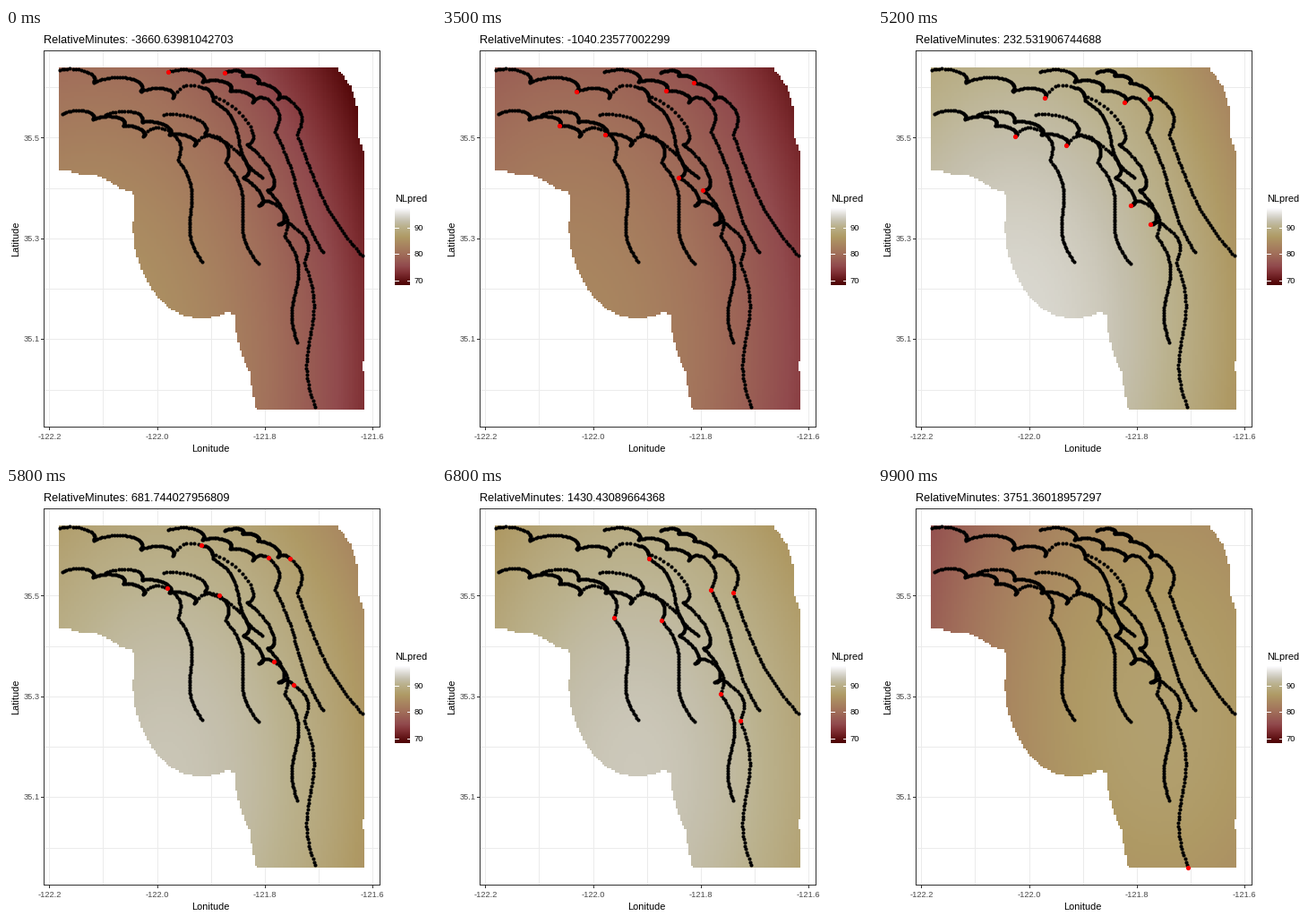
A matplotlib script for the animation above (10 s loop, 480x480 px).

```python
import numpy as np
import matplotlib.pyplot as plt
from matplotlib.animation import FuncAnimation
from matplotlib.colors import LinearSegmentedColormap
from matplotlib.patches import Rectangle

SIZE, DPI, FRAMES = 480, 80, 100
PT = 72 / DPI
T0, SPAN = -3660.6398104270298, 7412
LOW, HIGH = 68, 96.7
LEFT, RIGHT, TOP, BOTTOM = 59, 400, 44, 426
REACH = 63

plt.rcParams["font.family"] = "Liberation Sans"

STOPS = [(LOW, "#4c0001"), (72.5, "#7f2f33"), (75, "#914a4d"),
         (80, "#a2715b"), (86, "#af9a65"), (90, "#bbb28e"),
         (92, "#c5c0ae"), (94, "#dad8d0"), (HIGH, "#fdfdff")]
CMAP = LinearSegmentedColormap.from_list(
    "noise", [((v - LOW) / (HIGH - LOW), c) for v, c in STOPS], N=512)


class Track:
    """Scalloped drift between turning points, then a swaying run south."""

    def __init__(self, *pts, start=T0 + 40, end=3700, sway=7, bow=0):
        self.p = np.array(pts, float)
        self.times = np.array([start, -2600, -1040, 232, 682, 1430, end])
        self.start, self.end, self.sway, self.bow = start, end, sway, bow

    def at(self, t):
        last = len(self.p) - 2
        k = np.clip(np.searchsorted(self.times, t, "right") - 1, 0, last)
        u = (t - self.times[k]) / (self.times[k + 1] - self.times[k])
        d = self.p[k + 1] - self.p[k]
        length = np.hypot(*d.T)
        normal = np.stack([d[..., 1], -d[..., 0]], -1) / length[..., None]
        hump = np.sin(np.pi * u)
        along = u + np.where(k < 3, 0.42, 0) * hump * u
        side = np.where(k < last, 0.23 * length * hump,
                        self.sway * np.sin(2 * np.pi * u) + self.bow * hump)
        return self.p[k] + d * along[..., None] + normal * side[..., None]

    def dots(self):
        return self.at(np.arange(self.start, self.end + 1, 52))


tracks = [
    Track((60, 47), (97, 61), (150, 71), (186, 78), (218, 66), (231, 81),
          (288, 168)),
    Track((181, 49), (219, 60), (250, 70), (275, 83), (293, 80), (300, 116),
          (355, 252), start=T0, sway=3, bow=-2),
    Track((244, 50), (264, 53), (281, 61), (303, 79), (317, 81), (325, 119),
          (399, 256), start=T0, sway=1, bow=-9),
    Track((63, 96), (97, 102), (131, 109), (153, 121), (180, 114), (192, 147),
          (220, 263)),
    Track((111, 97), (151, 105), (182, 119), (210, 131), (238, 122),
          (245, 150), (283, 265)),
    Track((176, 97), (221, 118), (264, 167), (282, 198), (299, 196),
          (311, 232), (326, 353), bow=5),
    Track((230, 75), (268, 130), (291, 181), (304, 219), (321, 222),
          (333, 262), (346, 426), end=T0 + SPAN),
]
dots = np.vstack([tr.dots() for tr in tracks])

# Tiles near any track carry the noise field
gx, gy = np.meshgrid(LEFT + (np.arange(142) + .5) * (RIGHT - LEFT) / 142,
                     TOP + (np.arange(169) + .5) * (BOTTOM - TOP) / 169)
OUTSIDE = np.ones(gx.shape, bool)
for px, py in dots:
    OUTSIDE &= (gx - px) ** 2 + (gy - py) ** 2 > REACH ** 2
X, Y = (gx - 230) / 200, (gy - 235) / 200

# Level and slopes of the field, eased from one time to the next
WHEN = [T0, -2238, -1040, 232, 682, 1430, T0 + SPAN]
LEVEL = [81.8, 84.4, 81.5, 92.7, 91.7, 92.3, 86]
EAST = [-7.4, -5.3, -4.9, -4.2, -2.8, -0.8, 4.6]
SOUTH = [3, 2.8, 2.5, 2, 1.8, 1.7, 0.5]


def field(t):
    level, east, south = (np.interp(t, WHEN, v) for v in (LEVEL, EAST, SOUTH))
    z = level + east * X + south * Y - 5.5 * X ** 2 - 2 * Y ** 2
    return np.ma.array(z, mask=OUTSIDE)


fig = plt.figure(figsize=(SIZE / DPI, SIZE / DPI), dpi=DPI, facecolor="white")
ax = fig.add_axes([0, 0, 1, 1])


def text(x, y, s, px, color="black", **kw):
    return ax.text(x, y, s, fontsize=px * PT, color=color, **kw)


def line(x, y, color, z=1):
    ax.plot(x, y, color=color, lw=PT, zorder=z, antialiased=False,
            solid_capstyle="butt")


# Grid, axis ticks and labels
for i in range(7):
    x = 48.3 + i * 60.15
    line((x, x), (25, 444), "#ebebeb")
    if i % 2 == 0:
        line((x, x), (445, 448), "#333333")
        text(x, 459, f"{-122.2 + i / 10:.1f}", 9.3, "#4d4d4d", ha="center")
for i in range(-1, 6):
    y = 122.3 + i * 56.25
    line((43, 417), (y, y), "#ebebeb")
    if i in (0, 2, 4):
        line((39, 42), (y, y), "#333333")
        text(37.5, y + 3.2, f"{35.5 - i / 10:.1f}", 9.3, "#4d4d4d", ha="right")
ax.add_patch(Rectangle((42.4, 24.6), 375, 420, fill=False, ec="#333333",
                       lw=PT, zorder=6, antialiased=False))
text(228.5, 473, "Lonitude", 11, ha="center")
text(11.5, 235, "Latitude", 11, ha="center", va="center", rotation=90)

# Legend
text(434, 194, "NLpred", 11)
ax.imshow(np.linspace(HIGH, LOW, 256)[:, None], cmap=CMAP, vmin=LOW, vmax=HIGH,
          extent=(434, 451, 287.5, 202), aspect="auto", zorder=2)
for value in (90, 80, 70):
    y = 222.6 + (90 - value) * 2.95
    line((434, 437.5), (y, y), "white", z=3)
    line((447.5, 451), (y, y), "white", z=3)
    text(456, y + 3.2, value, 9.3)

image = ax.imshow(field(T0), cmap=CMAP, vmin=LOW, vmax=HIGH, zorder=2,
                  extent=(LEFT, RIGHT, BOTTOM, TOP), aspect="auto",
                  interpolation="nearest")
ax.plot(*dots.T, "o", color="black", ms=4.1 * PT, mew=0, zorder=4)
now, = ax.plot([], [], "o", color="red", ms=5.2 * PT, mew=0, zorder=5)
title = text(42, 17, "", 12.8)

ax.set(xlim=(0, SIZE), ylim=(SIZE, 0))
ax.axis("off")


def update(i):
    t = T0 + SPAN * i / (FRAMES - 1)
    title.set_text(f"RelativeMinutes: {t:.15g}")
    image.set_data(field(t))
    live = [tr.at(t) for tr in tracks if tr.start - 1 <= t <= tr.end + 1]
    now.set_data(*np.array(live).T)
    return image, now, title


anim = FuncAnimation(fig, update, frames=FRAMES, interval=100, repeat=True)
plt.show()
```
